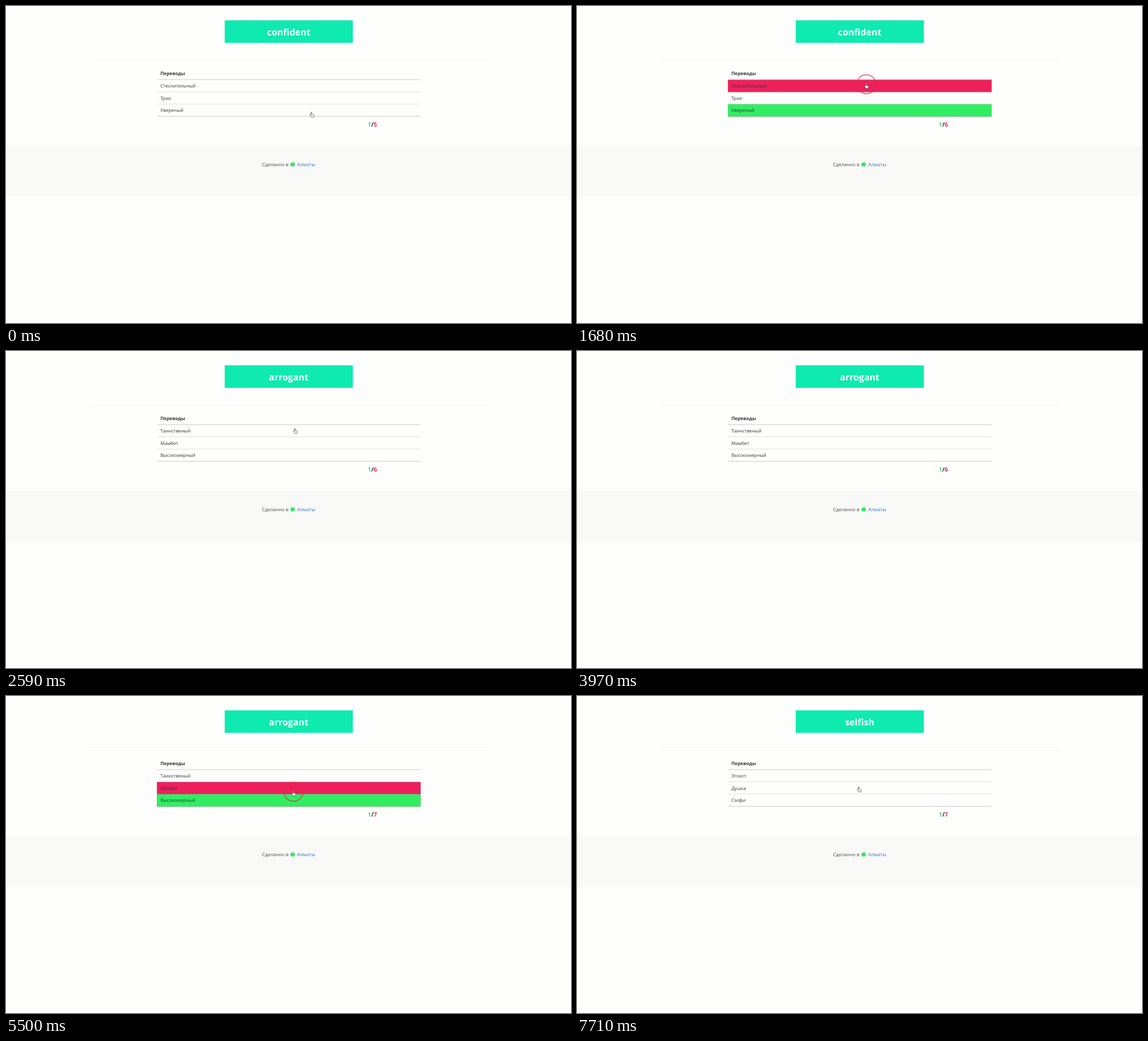
Write an HTML page that moves like this. It is 999 px wide and 560 px high and loops after 7840 ms.

```html
<!DOCTYPE html>
<html lang="ru">
<head>
<meta charset="utf-8">
<title>Переводы</title>
<style>
  html, body { margin: 0; width: 100%; height: 100%; overflow: hidden; background: #fefefd; }
  svg { display: block; width: 999px; height: 560px; }
  text { font: 8.2px "Open Sans", "Noto Sans", sans-serif; fill: #363636; text-rendering: geometricPrecision; white-space: pre; }
  .bold { font-weight: 700; }
  .mark { stroke: rgba(10, 10, 10, .1); stroke-width: .6; filter: drop-shadow(0 1px .8px rgba(10, 10, 10, .25)); }
</style>
</head>
<body>
<svg viewBox="0 0 999 560">
  <rect width="999" height="560" fill="#fefefd"/>
  <rect x="386.7" y="25.3" width="226.6" height="39.8" fill="#0feab0"/>
  <text id="word" class="bold" x="499.8" y="51.5" text-anchor="middle" style="font-size:16px;fill:#f7fffc"></text>
  <rect x="148" y="95" width="704" height="1" fill="#f1f1f0"/>
  <text class="bold" x="273" y="122.3">Переводы</text>
  <g id="lines"></g>
  <g id="rows"></g>
  <text class="bold" x="639.7" y="212.8" style="font-size:10.4px"><tspan fill="#42d97a">1</tspan><tspan fill="#222">/</tspan><tspan id="wrong" fill="#ea2a66"></tspan></text>
  <rect y="247" width="999" height="90" fill="#f9f9f8"/>
  <text x="452.8" y="282.9" style="font-size:8.3px;fill:#4a4a4a">Сделанно в</text>
  <g fill="#30e862">
    <path d="M506.8 277.1C505 276 502.9 277 502.9 279.5C502.9 281.7 504.2 283.6 505.5 283.6C506.1 283.6 506.4 283.3 506.8 283.3S507.6 283.6 508.2 283.6C509.5 283.6 510.8 281.7 510.8 279.5C510.8 277 508.6 276 506.8 277.1Z"/>
    <path d="M506.6 276.7Q506.5 274.7 508.6 274.6Q508.6 276.6 506.6 276.7Z"/>
  </g>
  <text x="515" y="282.9" style="font-size:8.5px;fill:#3a72cc">Алматы</text>
  <g id="pointer">
    <path id="hand" fill="#fff" stroke="#555" stroke-width=".8" stroke-linejoin="round"
      d="M-1.7 1V-3.8Q-1.7-4.6-1-4.6Q-.3-4.6-.3-3.8V-1L2.5-.3Q3.6 0 3.6 1L3 3V4.4H-1.3V3.6L-3.6.8Q-3.9 0-3-.1L-1.7 1Z"/>
    <circle id="ring" cx="-.2" cy="-3" r="16.8" fill="none" stroke="#dc2846" stroke-opacity=".6" stroke-width="2"/>
  </g>
</svg>
<script>
const LOOP = 7840;
const STEP = 140;   // the pointer is sampled at this interval
const IDLE = 2350;  // a resting pointer hides after this time
const RED = '#ee205c', GREEN = '#30ee61';
const ROW = 21.6, ANSWER = 2;
const el = id => document.getElementById(id);

function add(parent, name, attrs) {
  const node = document.createElementNS('http://www.w3.org/2000/svg', name);
  for (const key in attrs) node.setAttribute(key, attrs[key]);
  return parent.appendChild(node);
}

for (let i = 0; i < 4; i++) {
  const outer = i % 3 === 0;
  add(el('lines'), 'rect', {
    x: 267, y: 129.5 + ROW * i, width: 466, height: outer ? 1.2 : 1,
    fill: outer ? '#d2d2d2' : '#dedede'
  });
}

const bars = [0, 1, 2].map(i => add(el('rows'), 'rect',
  { class: 'mark', x: 267, y: 130.5 + ROW * i, width: 466, height: 21.2 }));
const labels = bars.map((_, i) => add(el('rows'), 'text', { x: 273, y: 144.2 + ROW * i }));

const rounds = [
  { start: 0, press: 1000, pick: 1680, row: 0, word: 'confident', options: ['Стеснительный', 'Трио', 'Увереный'] },
  { start: 2590, press: 5120, pick: 5370, row: 1, word: 'arrogant', options: ['Таинственый', 'Мамбет', 'Высокомерный'] },
  { start: 5940, press: LOOP, pick: LOOP, word: 'selfish', options: ['Эгоист', 'Душка', 'Сэлфи'] }
];

const home = { x: 541, y: 192 };
const moves = [
  { start: 30, end: 510, x: 511.8, y: 141.2 },
  { start: 4690, end: 4970, x: 508.6, y: 172.2 },
  { start: 7570, end: 7710, x: 499.2, y: 165 }
];

function pointerAt(t) {
  let { x, y } = home, shown = true;
  for (const move of moves) {
    const elapsed = Math.floor((t - move.start) / STEP) * STEP;
    if (elapsed <= 0) break;
    const u = Math.min(1, elapsed / (move.end - move.start));
    x += (move.x - x) * u;
    y += (move.y - y) * u;
    shown = t < move.end + IDLE;
  }
  return { x, y, shown };
}

function setText(node, text) {
  if (node.textContent !== String(text)) node.textContent = text;
}

function show(node, on) {
  node.style.display = on ? '' : 'none';
}

function draw(t) {
  const round = rounds.filter(r => r.start <= t).pop();
  const picked = t >= round.pick;
  setText(el('word'), round.word);
  setText(el('wrong'), 5 + rounds.filter(r => t >= r.pick).length);
  bars.forEach((bar, i) => {
    setText(labels[i], round.options[i]);
    show(bar, picked && (i === round.row || i === ANSWER));
    bar.setAttribute('fill', i === ANSWER ? GREEN : RED);
  });

  const { x, y, shown } = pointerAt(t);
  el('pointer').setAttribute('transform', `translate(${x} ${y})`);
  show(el('hand'), shown);
  show(el('ring'), t >= round.press && t < round.pick + STEP);
}

const start = performance.now();
function tick() {
  draw((performance.now() - start) % LOOP);
  requestAnimationFrame(tick);
}
tick();
</script>
</body>
</html>
```
